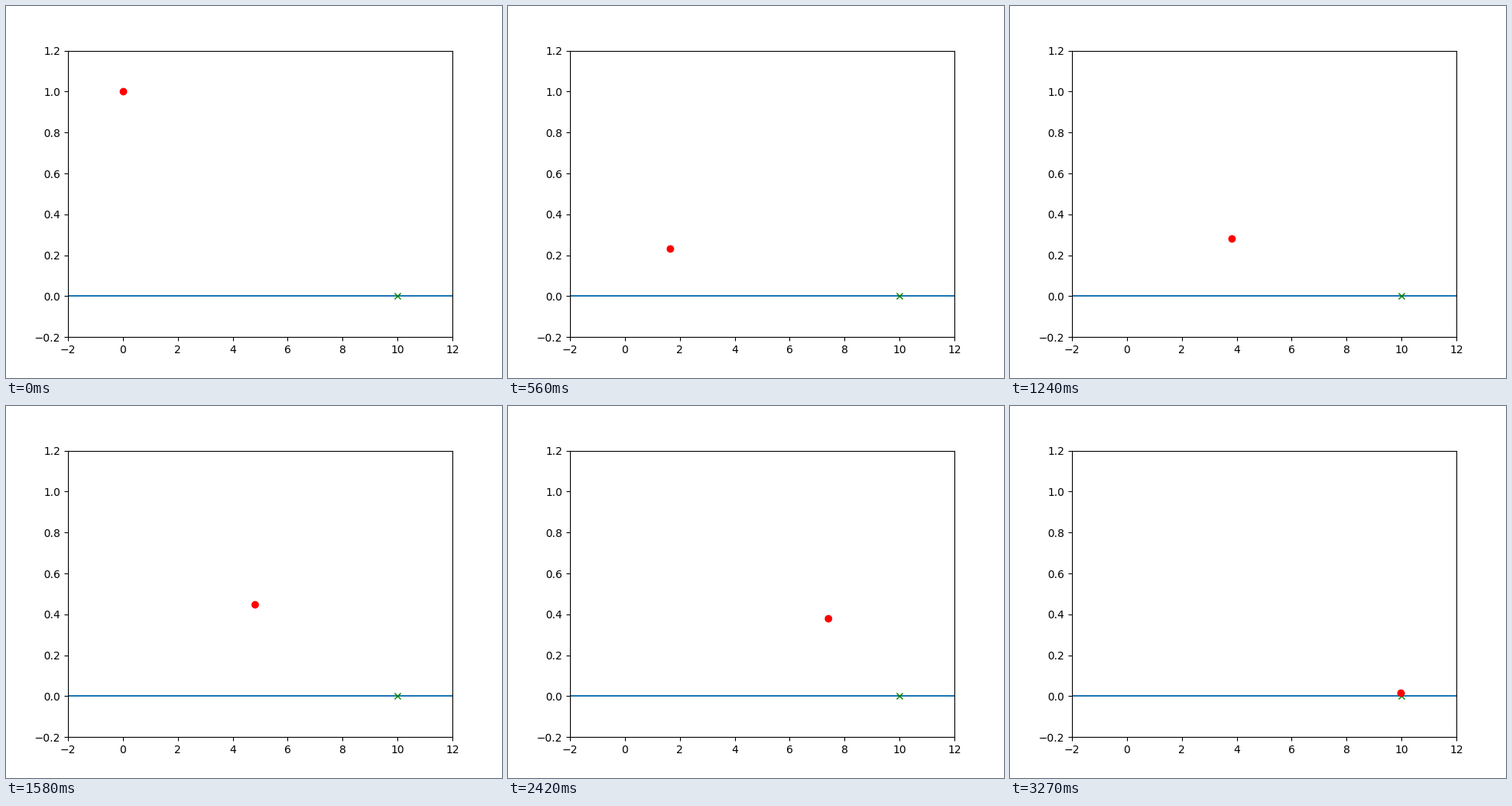
Recreate the animation shown at these times as a matplotlib script. Size 640 px wide and 480 px high, loop 3.3 s.

```python
import math

import matplotlib.pyplot as plt
from matplotlib.animation import FuncAnimation

LOOP_MS, TICK_MS, STEP_MS = 3300, 10, 25

# Motion measured along x, since the horizontal speed is constant.
GRAVITY = 0.805
DROP_SPEED = 0.15    # initial downward slope
BOUNCE = 0.85        # share of vertical speed kept at each impact
DX = 0.0777          # horizontal travel per step
STEPS = 132


def bounce_path(count):
    """Points of the ball; every flight restarts its steps at the impact."""
    points = []
    x0, y0, v0 = 0.0, 1.0, -DROP_SPEED
    while len(points) < count:
        impact = math.sqrt(v0 ** 2 + 2 * GRAVITY * y0)
        length = (v0 + impact) / GRAVITY
        for n in range(math.ceil(length / DX)):
            d = n * DX
            points.append((x0 + d, y0 + v0 * d - GRAVITY * d * d / 2))
        x0, y0, v0 = x0 + length, 0.0, BOUNCE * impact
    return points[:count]


path = bounce_path(STEPS)

fig, ax = plt.subplots(figsize=(6.4, 4.8), dpi=100)
ax.set_xlim(-2, 12)
ax.set_ylim(-0.2, 1.2)
ax.plot([-2, 12], [0, 0], color="C0")
ax.plot([10], [0], "gx")
ball, = ax.plot([0], [1], "ro")


def update(frame):
    step = (frame * TICK_MS + 10) // STEP_MS
    x, y = path[min(step, STEPS - 1)]
    ball.set_data([x], [y])
    return ball,


anim = FuncAnimation(fig, update, frames=LOOP_MS // TICK_MS,
                     interval=TICK_MS, repeat=True, repeat_delay=0)
plt.show()
```
